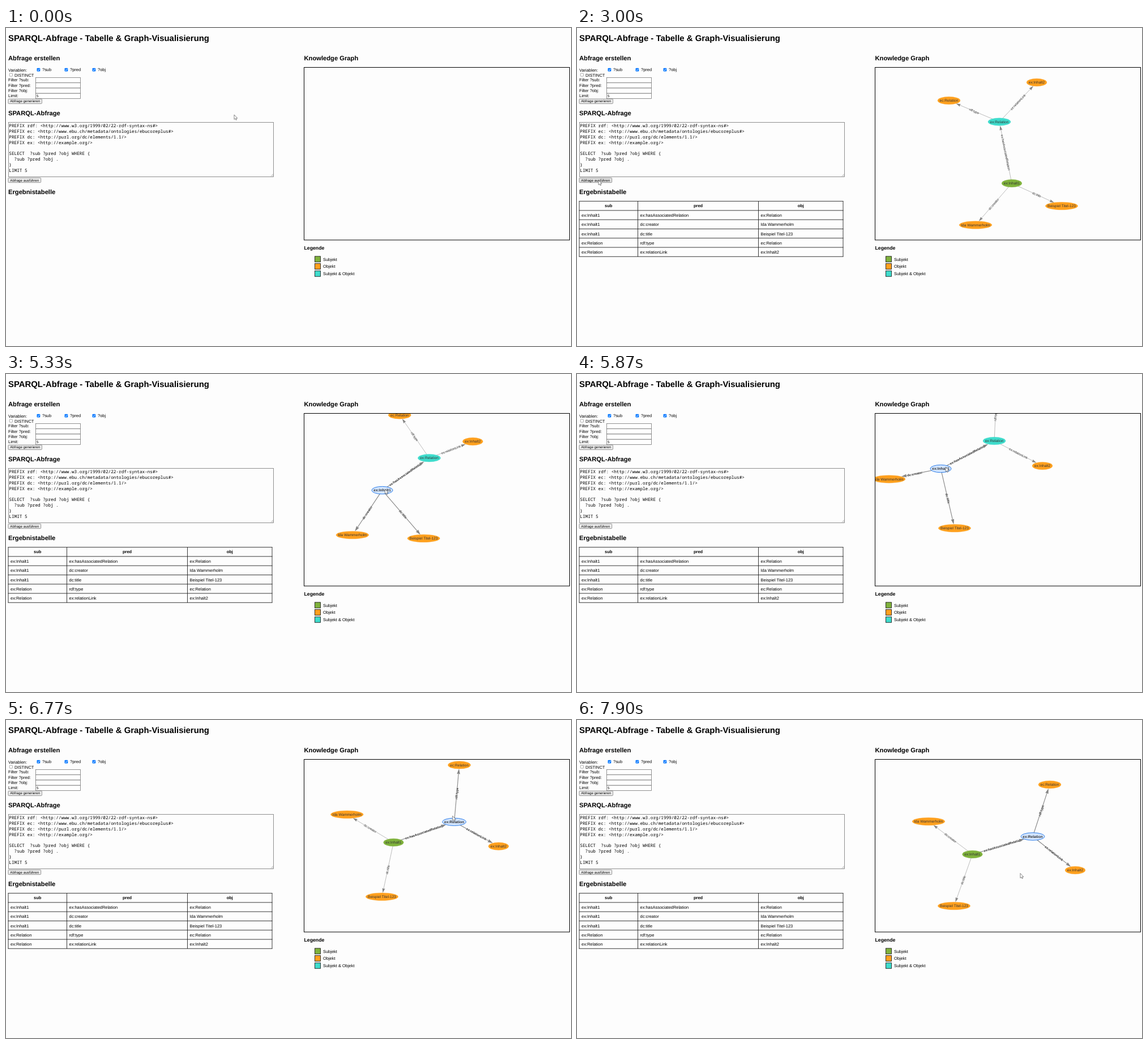
An HTML page for the animation above (8 s loop, 998x561 px).

```html
<!DOCTYPE html>
<html lang="de">
<head>
<meta charset="utf-8">
<title>SPARQL-Abfrage</title>
<style>
  html, body { margin: 0; width: 100%; height: 100%; overflow: hidden; background: #fdfdfd; }
  svg { display: block; width: 998px; height: 561px; font-family: "Liberation Sans", sans-serif; text-rendering: geometricPrecision; }
  text { white-space: pre; }
  .b { font-weight: bold; }
  .m { text-anchor: middle; }
  .code { font-family: "Noto Sans Mono", monospace; }
  .halo { paint-order: stroke; stroke: #fff; stroke-width: .95px; stroke-linejoin: round; }
</style>
</head>
<body>
<svg viewBox="0 0 998 561">
  <clipPath id="view"><rect x="527" y="70" width="468" height="303.5"/></clipPath>
  <g id="page"></g>
  <g id="table"></g>
  <g id="graph" clip-path="url(#view)"></g>
  <g id="cursor" stroke="#555" stroke-width=".7"></g>
</svg>
<script>
const LOOP = 8000, RUN = 2600, PICK_A = 4130, PICK_B = 6560;
const BODY = 7.46, H1 = 14.9, H2 = 11.2, H3 = 8.73, SMALL = 6.2;
const PERSON = 'Ida Wammerholm';
const GREEN = '#7fb23c', ORANGE = '#ffa01e', CYAN = '#3fdccc', GREY = '#848484';
const $ = id => document.getElementById(id);

const esc = s => s.replace(/&/g, '&amp;').replace(/</g, '&lt;');
const text = (x, y, s, size = BODY, cls = '', more = '') =>
  `<text x="${x}" y="${y}" font-size="${size}" class="${cls}" ${more}>${esc(s)}</text>`;
const rect = (x, y, w, h, fill = '#fff', stroke = '#000', more = '') =>
  `<rect x="${x}" y="${y}" width="${w}" height="${h}" fill="${fill}" stroke="${stroke}" ${more}/>`;
const path = (d, more) => `<path d="${d}" ${more}/>`;

function buildPage() {
  let out = text(4, 23.4, 'SPARQL-Abfrage - Tabelle & Graph-Visualisierung', H1, 'b')
    + text(4, 56.6, 'Abfrage erstellen', H2, 'b')
    + text(526.5, 56.6, 'Knowledge Graph', H2, 'b')
    + text(4, 153.7, 'SPARQL-Abfrage', H2, 'b')
    + text(4, 293, 'Ergebnistabelle', H2, 'b')
    + text(526.5, 391, 'Legende', H3, 'b')
    + text(4, 77, 'Variablen:');
  ['?sub', '?pred', '?obj'].forEach((name, i) => {
    const x = 54.5 + 49 * i;
    out += rect(x, 70.7, 5.8, 5.8, '#0075ff', 'none', 'rx="1"')
      + path(`M${x + 1.2} 73.7l1.3 1.4 2.2-3`, 'fill="none" stroke="#fff" stroke-width=".9"')
      + text(x + 9.5, 76.4, name);
  });
  out += rect(6.2, 80, 5.2, 5.2, '#fff', '#767676', 'rx="1" stroke-width=".6"') + text(15, 85.9, 'DISTINCT');
  ['Filter ?sub:', 'Filter ?pred:', 'Filter ?obj:', 'Limit:'].forEach((name, i) => {
    const y = 87.4 + 9.3 * i;
    out += text(4, y + 6.8, name) + rect(52.5, y, 79, 9.2, '#fff', '#767676', 'stroke-width=".8"');
  });
  out += text(54, 122, '5', SMALL)
    + rect(4, 125.2, 59.4, 8.2, '#efefef', '#767676', 'rx="1" stroke-width=".8"')
    + text(33.7, 131.4, 'Abfrage generieren', SMALL, 'm')
    + rect(4, 264.4, 57.6, 8.2, '#efefef', '#767676', 'id="run" rx="1" stroke-width=".8"')
    + text(32.8, 270.6, 'Abfrage ausführen', SMALL, 'm')
    + rect(4.5, 166.5, 468, 96, '#fdfdfd', '#767676', 'stroke-width=".8"')
    + path('M468 261.5l4-4M470.3 261.5l1.7-1.7', 'stroke="#777" stroke-width=".6"');
  [
    'PREFIX rdf: <http://www.w3.org/1999/02/22-rdf-syntax-ns#>',
    'PREFIX ec: <http://www.ebu.ch/metadata/ontologies/ebucoreplus#>',
    'PREFIX dc: <http://purl.org/dc/elements/1.1/>',
    'PREFIX ex: <http://example.org/>',
    '',
    'SELECT  ?sub ?pred ?obj WHERE {',
    '  ?sub ?pred ?obj .',
    '}',
    'LIMIT 5'
  ].forEach((line, i) => out += text(5.3, 175.1 + 9.87 * i, line, 7.7, 'code'));
  out += rect(526.5, 69.5, 469, 304.5, 'none');
  [['Subjekt', GREEN], ['Objekt', ORANGE], ['Subjekt & Objekt', CYAN]].forEach(([name, color], i) => {
    const y = 402.8 + 12.75 * i;
    out += rect(545.5, y, 10, 10, color, '#222', 'stroke-width=".9"') + text(560, y + 7.7, name);
  });
  return out;
}

function buildTable() {
  const cols = [4, 107.5, 320.5, 470], top = 305.6, pitch = 16.28;
  const rows = [
    ['ex:Inhalt1', 'ex:hasAssociatedRelation', 'ex:Relation'],
    ['ex:Inhalt1', 'dc:creator', PERSON],
    ['ex:Inhalt1', 'dc:title', 'Beispiel Titel-123'],
    ['ex:Relation', 'rdf:type', 'ec:Relation'],
    ['ex:Relation', 'ex:relationLink', 'ex:Inhalt2']
  ];
  const bottom = top + 6 * pitch;
  let lines = cols.map(x => `M${x} ${top}V${bottom}`).join('');
  for (let i = 0; i < 7; i++) lines += `M3.5 ${top + i * pitch}H470.5`;
  let out = path(lines, 'stroke="#222" stroke-width=".9"');
  ['sub', 'pred', 'obj'].forEach((s, i) => out += text((cols[i] + cols[i + 1]) / 2, 316.3, s, BODY, 'b m'));
  rows.forEach((row, r) => row.forEach((s, c) => out += text(cols[c] + 4, 333 + pitch * r, s)));
  return out;
}

// label, colour, horizontal radius
const nodes = [
  ['ex:Relation', CYAN, 20], ['ec:Relation', ORANGE, 20], ['ex:Inhalt2', ORANGE, 17.9],
  ['ex:Inhalt1', GREEN, 17.8], ['Beispiel Titel-123', ORANGE, 28.6], [PERSON, ORANGE, 28.8]
];
const RY = 6.7;
const edges = [
  [3, 0, 'ex:hasAssociatedRelation'], [3, 5, 'dc:creator'], [3, 4, 'dc:title'],
  [0, 1, 'rdf:type'], [0, 2, 'ex:relationLink']
];
// time, then x and y of each node
const poses = [
  [4600, 746, 165.5, 657, 128, 812, 96, 768, 274, 856, 314, 704, 347.5],
  [4770, 744, 166, 657.5, 125, 812, 95, 742.5, 279, 841, 306.5, 692, 358],
  [5400, 748, 146, 700, 66, 826, 122, 655, 196, 725, 288, 602, 275],
  [5870, 737, 118, 741, 30, 822, 162, 642.5, 167, 667, 272, 551, 185.5],
  [6370, 771, 149, 790, 50, 850, 202, 669.5, 198, 656, 293, 583, 152],
  [6970, 802, 195, 806, 94, 880, 233, 692, 225, 668, 321, 612, 174],
  [7330, 805, 200.5, 818, 105, 892, 244, 699.5, 233, 673, 326, 617, 181],
  [7900, 805, 205.5, 835, 114, 880, 265, 698.5, 237, 666, 328, 621, 179]
];
const pointer = [
  [900, 403, 153], [1570, 38, 268.5], [3430, 38, 268.5], [4050, 771, 274], [4600, 771, 274],
  [4770, 746.5, 279], [5400, 660, 194], [5870, 651, 164], [6230, 677, 192], [6370, 745, 141],
  [6500, 774, 147], [6600, 774, 147], [6970, 806, 195], [7380, 806, 196], [7750, 783, 270.5]
];

function sample(keys, t) {
  const i = keys.findIndex(k => k[0] > t);
  if (i <= 0) return keys.at(i).slice(1);
  const a = keys[i - 1], b = keys[i], u = (t - a[0]) / (b[0] - a[0]);
  return a.slice(1).map((v, j) => v + (b[j + 1] - v) * u);
}

function drawGraph(t) {
  const p = sample(poses, t);
  const settle = 1 - .05 * Math.max(0, 1 - (t - RUN) / 400) ** 2;
  const at = i => [761 + (p[2 * i] - 761) * settle, 221 + (p[2 * i + 1] - 221) * settle];
  const picked = t < PICK_A ? -1 : t < PICK_B ? 3 : 0;
  let lines = '', labels = '', heads = '', shapes = '';
  for (const [from, to, name] of edges) {
    const [x1, y1] = at(from), [x2, y2] = at(to), rx = nodes[to][2];
    const a = Math.atan2(y2 - y1, x2 - x1), c = Math.cos(a), s = Math.sin(a);
    const gap = rx * RY / Math.hypot(rx * s, RY * c);
    const on = from === picked || to === picked, size = on ? 9.4 : 8.2;
    const tx = x2 - c * gap, ty = y2 - s * gap, deg = a * 180 / Math.PI;
    const turn = deg < -90 ? deg + 180 : deg > 90 ? deg - 180 : deg;
    lines += path(`M${x1} ${y1}L${tx - c * size * .9} ${ty - s * size * .9}`,
      `stroke="${GREY}" stroke-width="${on ? 1.1 : .55}"`);
    labels += text(0, 1.9, name, 5.6, 'm halo' + (on ? ' b' : ''),
      `fill="#222" transform="translate(${(x1 + x2) / 2} ${(y1 + y2) / 2}) rotate(${turn})"`);
    heads += path('M0 0L-1 .3L-.9 0L-1-.3Z',
      `fill="${GREY}" transform="translate(${tx} ${ty}) rotate(${deg}) scale(${size})"`);
  }
  nodes.forEach(([name, color, rx], i) => {
    const [x, y] = at(i), on = i === picked;
    shapes += `<ellipse cx="${x}" cy="${y}" rx="${rx + (on ? .8 : 0)}" ry="${RY}" fill="${on ? '#d2e5ff' : color}"`
      + ` stroke="${on ? '#2b7ce9' : color}" stroke-width="${on ? 1 : .4}"/>`
      + text(x, y + 2.2, name, 6.55, on ? 'm b' : 'm', 'fill="#343434"');
  });
  return lines + labels + heads + shapes;
}

function drawCursor(t) {
  const [x, y] = sample(pointer, t);
  const inField = x > 4 && x < 472 && y > 166 && y < 262;
  const d = inField ? 'M-1.5-4h3M0-4V4M-1.5 4h3' : 'M0 0V8.3L1.9 6.7L3.2 9.4L4.5 8.8L3.3 6.2H5.8Z';
  return path(d, `fill="#fff" transform="translate(${x} ${y})"`);
}

$('page').innerHTML = buildPage();
$('table').innerHTML = buildTable();

function frame() {
  const t = performance.now() % LOOP, ran = t >= RUN;
  $('run').setAttribute('fill', t > 1530 && t < 3470 ? '#e3e3e3' : '#efefef');
  $('table').setAttribute('visibility', ran ? 'visible' : 'hidden');
  $('graph').innerHTML = ran ? drawGraph(t) : '';
  $('cursor').innerHTML = drawCursor(t);
  requestAnimationFrame(frame);
}
frame();
</script>
</body>
</html>
```
